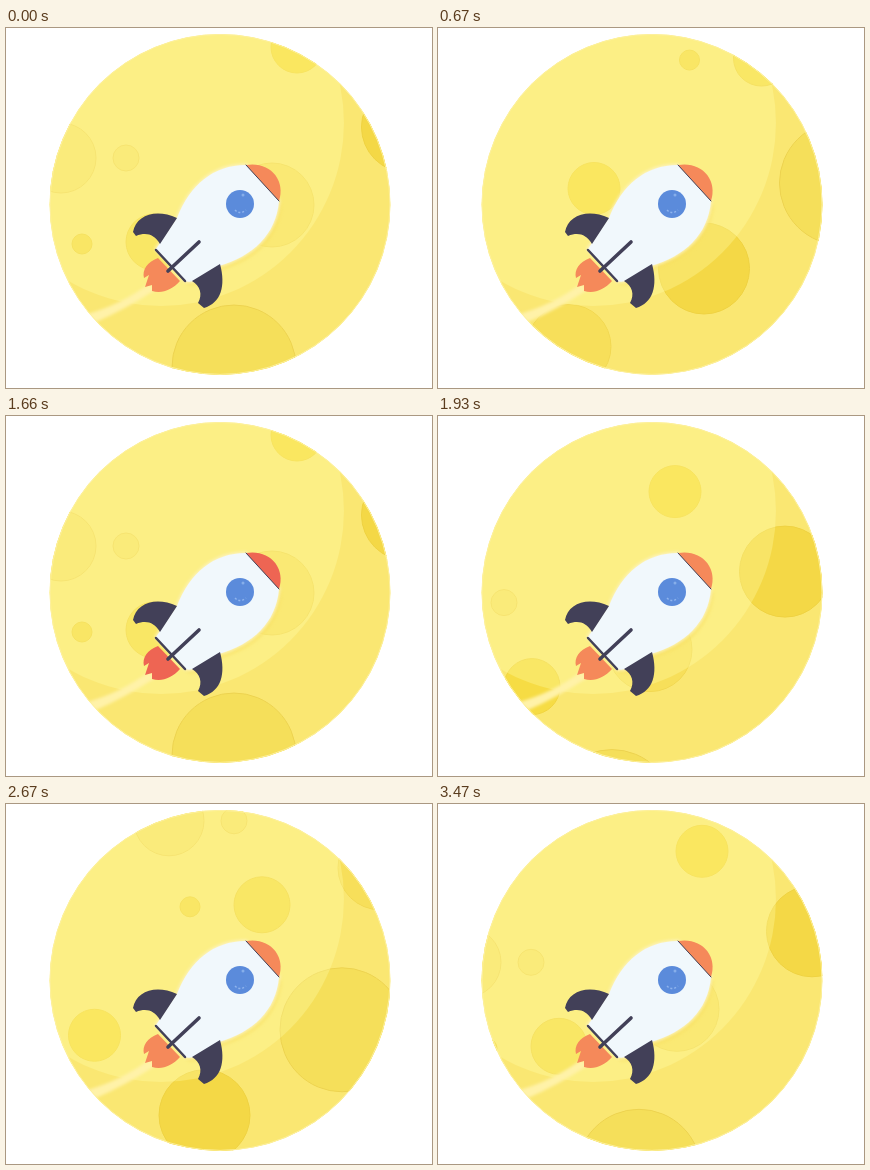
An HTML page for the animation above (3.54 s loop, 426 px wide and 360 px high).

```html
<!DOCTYPE html>
<html lang="en">
<head>
<meta charset="utf-8">
<title>Rocket</title>
<style>
html, body { margin: 0; height: 100%; overflow: hidden; background: #fff; }
svg { display: block; width: 426px; height: 360px; }
</style>
</head>
<body>
<svg viewBox="0 0 426 360">
  <defs>
    <clipPath id="disc"><circle cx="214" cy="176.4" r="170.5"/></clipPath>
    <filter id="soft" x="-20%" y="-20%" width="140%" height="140%"><feGaussianBlur stdDeviation="1.5"/></filter>
    <path id="hull" d="M240 137C207 137 184 157 171 190L150 221L179 253C188 256 200 248 213 238C247 228 270 207 273 173Z"/>
  </defs>

  <g clip-path="url(#disc)">
    <circle cx="214" cy="176.4" r="171" fill="#fae772"/>
    <g id="field"></g>
    <circle cx="155" cy="95" r="183" fill="#fffeb0" opacity=".3"/>
    <path d="M78 287Q115 277 144 255L149 262Q118 282 90 294Z" fill="#fff2a8" filter="url(#soft)"/>
    <circle cx="214" cy="176.4" r="170" fill="none" stroke="#fdf0a0"/>
  </g>

  <use href="#hull" fill="#f8df60" opacity=".5" transform="translate(3 4)" filter="url(#soft)"/>
  <path class="hot" d="M152 230C141 234 136 242 138 250L143 247L139 259L146 257L146 263C156 266 166 262 174 253Z"/>
  <use href="#hull" fill="#fdf3bd" stroke="#fdf3bd" stroke-width="2.5" filter="url(#soft)"/>
  <use href="#hull" fill="#f1f8fc"/>
  <path class="hot" d="M240 137C263 133 280 151 273 173Z"/>
  <g fill="#424058">
    <path d="M127 204C130 187 150 180 171 190L154 216C148 206 140 204 130 208Z"/>
    <path d="M214 236C220 258 215 275 198 280L192 275C197 266 194 258 186 253Z"/>
  </g>
  <g stroke="#424058" stroke-linecap="round">
    <path d="M240 137L273 173" stroke-width="1"/>
    <path d="M150 222L179 253" stroke-width="2.5"/>
    <path d="M162 243L193 214" stroke-width="3.6"/>
  </g>
  <circle cx="234" cy="176" r="14" fill="#5b8bdb"/>
  <circle cx="237" cy="167" r="1.5" fill="#86aeea"/>
  <path d="M229 182Q234 187 240 182" fill="none" stroke="#8fb4ee" stroke-width="1.5" stroke-dasharray="2 2"/>
</svg>
<script>
const LOOP = 3540, CYCLE = 23, VX = -13.5, VY = 14.15;

// x, y, radius, fill, rim
const craters = [
  [76, 216, 10, '#f6db44', '#f1d43e'],
  [120, 130, 13, '#f8e262', '#f2d856'],
  [55, 130, 35, '#f8e264', '#f2d858'],
  [291, 19, 26, '#f7dc3e', '#f4d73c'],
  [148, 214, 28, '#f6dc44', '#f1d440'],
  [401, 99, 45.5, '#f4d846', '#efd242'],
  [228, 339, 62, '#f5df5a', '#edd350'],
  [266, 177, 42, '#f7df5a', '#f2d852']
];

// Runs of evenly spaced position changes: first ms, last ms, count
const runs = [
  [70, 530, 8], [600, 1000, 7], [1140, 1140, 1], [1270, 1660, 7],
  [1730, 2190, 8], [2260, 2740, 8], [2870, 3050, 4], [3200, 3470, 5]
];

const field = document.getElementById('field');
const hot = document.querySelectorAll('.hot');

field.innerHTML = [-CYCLE, 0].map(lead =>
  `<g transform="translate(${lead * VX} ${lead * VY})">` +
  craters.map(([x, y, r, fill, rim]) =>
    `<circle cx="${x}" cy="${y}" r="${r}" fill="${fill}" stroke="${rim}"/>`).join('') +
  '</g>').join('');

function stepAt(t) {
  return runs.reduce((sum, [from, to, count]) => {
    if (t < from) return sum;
    if (t >= to) return sum + count;
    return sum + 1 + Math.floor((t - from) / (to - from) * (count - 1) + 0.05);
  }, 0);
}

function draw(now) {
  const t = now % LOOP;
  const step = stepAt(t) % CYCLE;
  field.setAttribute('transform', `translate(${step * VX} ${step * VY})`);
  const color = t >= 1140 && t < 1730 ? '#ee6553' : '#f5895a';
  hot.forEach(part => part.setAttribute('fill', color));
}

let start;
function tick(now) {
  start ??= now;
  draw(now - start);
  requestAnimationFrame(tick);
}
draw(0);
requestAnimationFrame(tick);
</script>
</body>
</html>
```
